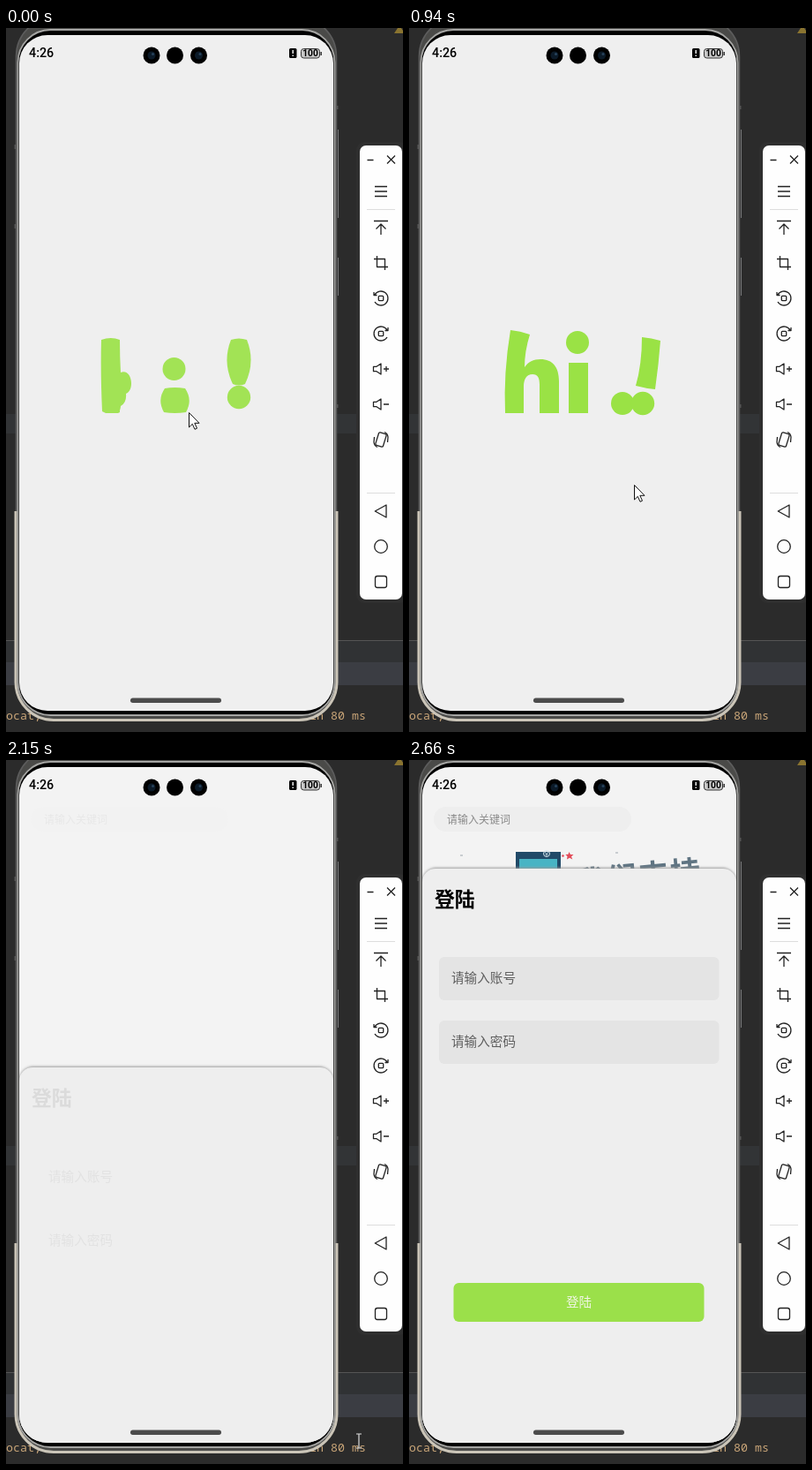
Animation of 450 by 797 pixels, one loop 3020 ms. Source, as an HTML page:

```html
<!DOCTYPE html>
<html lang="zh">
<head>
<meta charset="utf-8">
<style>
  html, body { margin: 0; width: 100%; height: 100%; overflow: hidden; background: #2b2b2b; }
  svg { display: block; font-family: "Noto Sans CJK SC", "Noto Sans CJK", sans-serif; }
  .mono { font: 13.33px "Noto Sans Mono", monospace; fill: #c9a578; }
  .icons { fill: none; stroke: #222; stroke-width: 1.3; stroke-linejoin: round; }
  .field { font-size: 14.6px; fill: #5e5e5e; }
</style>
</head>
<body>
<svg width="450" height="797" viewBox="0 0 450 797">
  <defs>
    <clipPath id="screen"><rect x="15" y="8" width="356" height="765" rx="32"/></clipPath>
    <filter id="blur" x="-10%" y="-10%" width="120%" height="120%"><feGaussianBlur stdDeviation="1.4"/></filter>
  </defs>

  <!-- desktop -->
  <rect width="450" height="797" fill="#2b2b2b"/>
  <path d="M0 437H450V459H0Z" fill="#323436"/>
  <path d="M0 694H450V718H0Z" fill="#303234"/>
  <path d="M0 718H450V744H0Z" fill="#3b3d43"/>
  <path d="M0 693.5H450" stroke="#555"/>
  <path d="M440 6L446 -3L452 6Z" fill="#8a7430"/>
  <text class="mono" x="0" y="783">ocat,</text>
  <text class="mono" x="344" y="783">in 80 ms</text>

  <!-- phone -->
  <path d="M376.5 115V215M376.5 260V303" stroke="#77787a"/>
  <path d="M10.5 132V137M10.5 222V227M375.5 88V92M375.5 426V430" stroke="#555" stroke-width="2"/>
  <rect x="11.5" y="-12" width="363" height="795" rx="44" fill="#4a4a48" stroke="#5c5c5c" stroke-width="1.5"/>
  <path d="M11 547V740A43 43 0 0 0 54 783.500H332A43 43 0 0 0 375 740V547" fill="none" stroke="#cbc5b8" stroke-width="3"/>
  <rect x="13.500" y="2" width="359" height="776" rx="37" fill="#000" stroke="#a5a5a3" stroke-width="1.8"/>

  <g clip-path="url(#screen)">
    <rect id="back" x="15" y="8" width="356" height="765"/>
    <g id="logo" fill="#9ae245">
      <path id="h"/><path id="i"/><path id="bang"/>
      <circle id="iDot" r="13"/><circle id="stop" r="13"/><circle id="bangDot" r="13.2"/>
    </g>
    <g id="page">
      <g id="home">
        <rect x="28" y="53" width="224" height="28" rx="14" fill="#eee"/>
        <text x="43" y="72" font-size="12" fill="#8a8a8a">请输入关键词</text>
        <g id="banner">
          <rect id="card" x="28" y="104" width="329" height="120" rx="8" fill="#e8e8e8"/>
          <path d="M121 104H172V200H121Z" fill="#214a68"/>
          <path d="M125 112H168V200H125Z" fill="#48b4c4"/>
          <circle cx="156" cy="106" r="3.5" fill="none" stroke="#d5e6ec"/>
          <path d="M154 104L156 106.500L158 104M156 106V109M154.500 107H157.500" fill="none" stroke="#d5e6ec" stroke-width=".7"/>
          <path d="M110 132Q111 122 121 123V132ZM172 123Q178 121 180 132H172Z" fill="#e8b892"/>
          <path d="M181.500 104L183 107L186.500 107L184 109.300L185.300 112.500L182 110.800L179 112.500L179.500 109.100L177.200 107L180.500 106.800Z" fill="#e34c5a"/>
          <circle cx="174.500" cy="108.500" r="1.300" fill="#e34c5a"/>
          <path d="M58 108H61M234 105H237" stroke="#c8ccd0" stroke-width="2"/>
          <text transform="translate(190 151) rotate(-5.500)" font-size="34" font-weight="700" letter-spacing="2" fill="#5f7482">我们支持</text>
        </g>
      </g>
      <g id="sheet">
        <rect x="15" y="0" width="356" height="800" rx="16" fill="#999" filter="url(#blur)"/>
        <rect x="15" y="1" width="356" height="800" rx="15" fill="#eee"/>
        <g id="form">
          <text x="29" y="44" font-size="22.800" font-weight="700">登陆</text>
          <g id="fields" fill="#e4e4e4">
            <rect x="34" y="101" width="317.500" height="49" rx="6"/>
            <rect x="34" y="173" width="317.500" height="49" rx="6"/>
          </g>
          <text class="field" x="48" y="130">请输入账号</text>
          <text class="field" x="48" y="202">请输入密码</text>
          <rect x="50.500" y="470" width="284" height="44" rx="6" fill="#9be04a"/>
          <text x="192.500" y="497" font-size="14.600" text-anchor="middle" fill="#f0f5e4">登陆</text>
        </g>
      </g>
    </g>

    <!-- status bar -->
    <text x="26" y="33" font-family="Roboto, sans-serif" font-size="14.300" font-weight="500">4:26</text>
    <g id="cameras"></g>
    <rect x="321" y="23" width="8.500" height="11" rx="1.500"/>
    <path d="M325.200 25V29M325.200 30.500V32" stroke="#fff" stroke-width="1.400"/>
    <rect x="334.500" y="23.500" width="21" height="10.500" rx="3" fill="#c9c9c9" stroke="#333"/>
    <path d="M357.200 27V31" stroke="#333" stroke-width="1.500"/>
    <text x="345" y="32.400" text-anchor="middle" font-family="Roboto, sans-serif" font-size="10.300" font-weight="700">100</text>
    <rect x="141" y="758.500" width="103" height="5.500" rx="2.700" fill="#4c4c4c"/>
  </g>

  <!-- emulator toolbar -->
  <rect x="397" y="129" width="58" height="522" rx="9" fill="#2f2f2f"/>
  <rect x="401" y="133" width="48" height="514" rx="7" fill="#fefefe"/>
  <path d="M409 205.500H441M409 526.500H441" stroke="#ddd"/>
  <g class="icons">
    <path d="M409.500 149.500H416.500M432 144.500L441 153.500M441 144.500L432 153.500"/>
    <g transform="translate(425 185)"><path d="M-7 -5.500H7M-7 0H7M-7 5.500H7"/></g>
    <g transform="translate(425 226)"><path d="M-8 -7.500H8M0 8V-4M-5.500 1.500L0 -4L5.500 1.500"/></g>
    <g transform="translate(425 266)"><path d="M-4.500 -8V4.500H8M-8 -4.500H4.500V8"/></g>
    <g id="turn" transform="translate(425 306)">
      <path d="M-7 -4A8 8 0 1 1 -7 4M-8 -7V-3.500H-4.500"/><rect x="-2.700" y="-2.700" width="5.400" height="5.400" rx="1"/>
    </g>
    <use href="#turn" transform="translate(850 40) scale(-1 1)"/>
    <g id="volume" transform="translate(425 386)"><path d="M-8.500 -2.700H-5L0 -6V6L-5 2.700H-8.500ZM3 0H9"/></g>
    <use href="#volume" y="40"/>
    <path d="M431 383V389"/>
    <g transform="translate(425 466)">
      <rect x="-4.500" y="-7.500" width="9" height="15" rx="1.500" transform="rotate(17)"/>
      <path d="M-7.500 -3L-8 3Q-7.500 7 -4 8.500M7.500 3L8 -3Q7.500 -7 4 -8.500"/>
    </g>
    <path d="M418.300 547L431 540V554Z"/>
    <circle cx="425" cy="587" r="7.300"/>
    <rect x="418.500" y="620.500" width="13" height="13" rx="2.500"/>
  </g>

  <g id="pointer">
    <path id="arrow" d="M.5 .5V17L4.300 13.300L7 19.300L9.500 18.200L6.800 12.300H12Z" fill="#fff" stroke="#111"/>
    <path id="beam" d="M-3 -8H3M0 -8V8M-3 8H3" fill="none" stroke="#ddd" stroke-width="1.200"/>
  </g>
</svg>
<script>
const $ = id => document.getElementById(id);
const LOOP = 3020;
const REVEAL = 2150;

const refresh = [0, 120, 240, 370, 510, 660, 790, 940, 1090, 1220, 1340, 1490,
  1640, 1760, 1890, 2010, 2150, 2280, 2420, 2540, 2660];

const hBent = "M98 346Q108 341 122 344Q123 366 127 386C132 376 140 372 149 372C164 373 165 386 167 400Q169 413 177 419Q168 426 157 428Q149 418 147 404C146 396 144 390 140 390C133 390 128 398 129 406L129 436L109 436Q111 390 98 346Z";
const hLean = "M115 342Q126 343 137 347Q131 366 131 384C135 378 141 375 149 375C163 375 170 384 170 400Q170 418 170 436Q159 436 148 436Q148 420 148 404C148 396 146 392 140 392C133 392 130 398 130 406L130 436L109 436Q107 390 115 342Z";
const hStill = "M108 344Q119 344 130 344Q130 365 130 386C134 378 141 375 149 375C163 375 170 384 170 400Q170 418 170 436Q159 436 148 436Q148 420 148 404C148 396 146 392 140 392C133 392 130 398 130 406L130 436L108 436Q108 390 108 344Z";
const bangStill = "M254 353Q264 353 275 353Q275 380 274 408Q264 408 255 408Q254 380 254 353Z";
const bangLeft = "M251 353Q262 351 272 352Q274 380 274 408Q264 408 254 408Q252 380 251 353Z";

const shapes = {
  h: [
    [0, "M108 353Q119 349 129 353Q129 372 130 390C137 387 142 394 142 402C142 408 140 412 136 414Q137 424 130 428Q130 430 129 433Q129 434 129 435C128 436 126 436 124 436C122 436 120 436 118 436L113 436L109 434Q107 390 108 353Z"],
    [370, hBent], [510, hBent], [790, hLean], [940, hLean], [1220, hStill]],
  i: [
    [0, "M180 408Q191 406 203 408Q212 421 204 435Q191 437 179 435Q171 421 180 408Z"],
    [370, "M180 382Q191 381 202 382Q202 409 202 436Q191 438 180 436Q180 409 180 382Z"],
    [510, "M180 383Q191 381 202 383Q202 409 202 436Q191 438 180 436Q180 409 180 383Z"],
    [790, "M181 379Q192 379 203 379Q203 408 203 436Q192 436 181 436Q181 408 181 379Z"]],
  bang: [
    [0, "M255 353Q264 350 273 353Q283 378 271 403Q264 406 257 403Q245 378 255 353Z"],
    [370, bangStill], [790, bangStill],
    [940, "M264 350Q275 351 285 354Q283 381 279 409Q268 408 257 405Q264 381 264 350Z"],
    [1340, bangStill], [1640, bangLeft], [1760, bangLeft], [2010, bangStill]],
};
const dots = {
  iDot: [[0, "190.5 386"], [240, "191 347"], [370, "191 347"], [510, "191 351"], [790, "191 356"]],
  stop: [[0, "192 422"], [240, "194 421"], [510, "221 421"], [790, "238 425"], [940, "242 425"], [1490, "225 425"]],
  bangDot: [[0, "264 418"], [510, "264 421"], [940, "265 425"], [1490, "264 425"]],
};
const pointerPath = [[0, "207 435"], [370, "215 445"], [510, "225 466"], [790, "247 512"], [940, "255 517"],
  [1340, "296 654"], [1490, "296 654"], [1760, "346 701"], [2010, "392 745"], [2150, "400 771"], [2280, "414 789"]];
const homeFade = [[2150, "0.1"], [2280, "0.6"], [2420, "1"]];
const formFade = [[2150, "0.08"], [2420, "0.7"], [2660, "1"]];
const cardFade = [[2420, "0.8"], [2660, "0"]];

// Blends every number of two equally built strings.
function blend(a, b, k) {
  const target = b.match(/[\d.]+/g);
  let n = 0;
  return a.replace(/[\d.]+/g, v => +(+v + (target[n++] - v) * k).toFixed(3));
}

function at(keys, t) {
  const next = keys.findIndex(key => key[0] > t);
  if (next === 0) return keys[0][1];
  if (next < 0) return keys[keys.length - 1][1];
  const [t0, a] = keys[next - 1], [t1, b] = keys[next];
  return blend(a, b, (t - t0) / (t1 - t0));
}

const show = (id, on) => $(id).setAttribute("display", on ? "inline" : "none");
const fade = (id, value) => $(id).setAttribute("opacity", value);
const move = (id, x, y) => $(id).setAttribute("transform", `translate(${x} ${y})`);

$("cameras").innerHTML = [165, 191.5, 218.5].map((x, n) =>
  `<circle cx="${x}" cy="31" r="9.500"/>` + (n === 1 ? "" :
  `<circle cx="${x}" cy="31" r="4.500" fill="#0b1a28"/><circle cx="${x + 1.5}" cy="29.500" r="1.500" fill="#28435c"/>`)).join("");

function draw(t) {
  const revealed = t >= REVEAL;
  $("back").setAttribute("fill", revealed ? "#f3f3f3" : "#efefef");
  show("logo", !revealed);
  show("page", revealed);

  fade("logo", t < 120 ? 0.9 : 1);
  for (const id in shapes) $(id).setAttribute("d", at(shapes[id], t));
  for (const id in dots) move(id, ...at(dots[id], t).split(" "));

  const form = +at(formFade, t);
  fade("home", at(homeFade, t));
  show("banner", t > REVEAL);
  fade("card", at(cardFade, t));
  fade("form", form);
  fade("fields", form ** 5);
  move("sheet", 0, 122 + 225 * Math.exp((REVEAL - t) / 67));

  move("pointer", ...at(pointerPath, t).split(" "));
  show("pointer", t < 2420);
  show("arrow", !revealed);
  show("beam", revealed);
}

function tick(now) {
  const t = now % LOOP;
  draw(refresh.filter(r => r <= t).pop());
  requestAnimationFrame(tick);
}
tick(performance.now());
</script>
</body>
</html>
```
